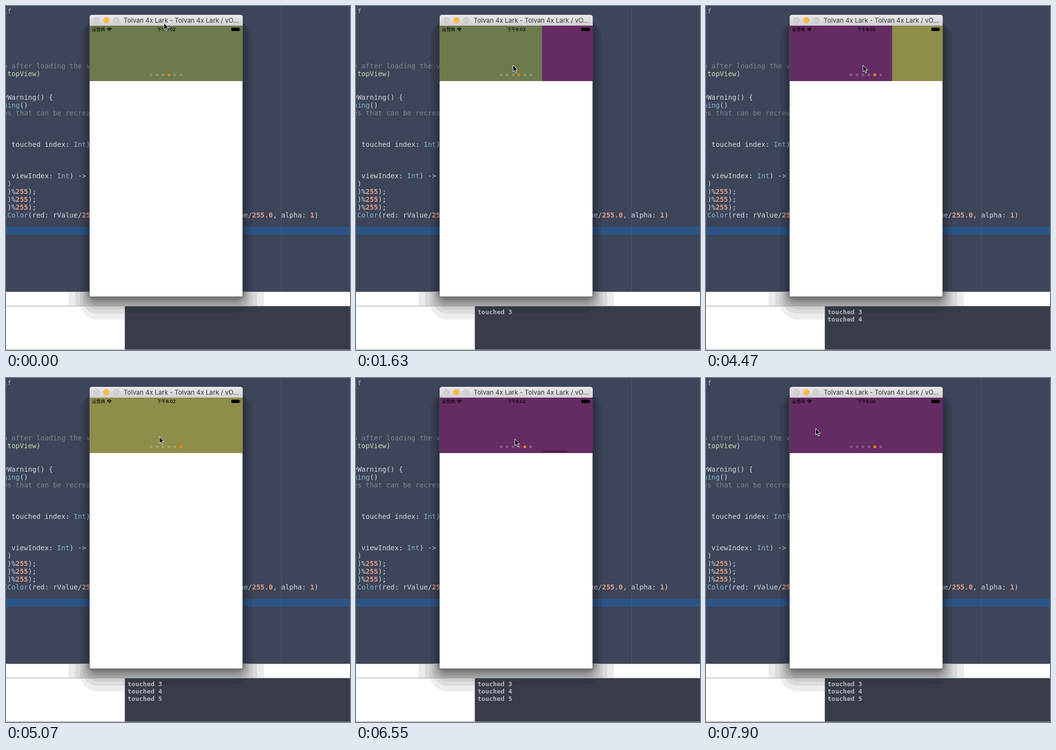
Animation, 699 px wide and 701 px high, one loop 8000 ms. Source, as an HTML page:

```html
<!DOCTYPE html>
<html lang="en">
<head>
<meta charset="utf-8">
<title>Pager in a simulator window</title>
<style>
  html, body { margin: 0; width: 100%; height: 100%; overflow: hidden; background: #3d455a; }
  svg { display: block; width: 699px; height: 701px; }
  text { white-space: pre; }
  .code { font: 14px "DejaVu Sans Mono", monospace; fill: #d3d8e0; }
  .comment { fill: #7d868f; }
  .type { fill: #84b4c8; }
  .call { fill: #c2dba6; }
  .keyword { fill: #c79abb; }
  .number { fill: #e3a088; font-weight: bold; }
  .log { font: bold 13px "DejaVu Sans Mono", monospace; fill: #b4b8be; }
  .title { font: 13px Inter, sans-serif; fill: #343436; }
  .status { font: 500 9px Inter, "Noto Sans CJK SC", "Noto Sans CJK", sans-serif; fill: #000; }
</style>
</head>
<body>
<svg viewBox="0 0 699 701">
  <defs>
    <linearGradient id="chrome" x2="0" y2="1">
      <stop stop-color="#ebe8ec"/><stop offset="1" stop-color="#d2cfd3"/>
    </linearGradient>
    <clipPath id="banner"><rect x="170" y="40" width="310.5" height="113"/></clipPath>
    <clipPath id="onDark"><path d="M0 0H699V582H0ZM242 612H699V700H242Z"/></clipPath>
    <clipPath id="onLight"><path d="M0 583H699V611H0ZM0 612H241V700H0Z"/></clipPath>
    <clipPath id="onStrip"><path d="M0 583H699V611H0Z"/></clipPath>
  </defs>

  <rect width="699" height="582" fill="#3d455a"/>
  <rect y="450" width="699" height="16" fill="#2c5586"/>
  <rect x="559" width="1" height="582" fill="#51596c"/>
  <g id="editor"></g>

  <rect y="582" width="699" height="119" fill="#fff"/>
  <rect x="242" y="612" width="457" height="88" fill="#373c48"/>
  <rect x="241" y="612" width="1" height="88" fill="#8e9096"/>
  <g fill="#9b9b9b">
    <rect y="582" width="699" height="1"/>
    <rect y="611" width="699" height="1"/>
    <rect y="700" width="699" height="1"/>
  </g>
  <g id="stripShadow" clip-path="url(#onStrip)"></g>
  <g id="lightShadow" clip-path="url(#onLight)"></g>
  <g id="darkShadow" clip-path="url(#onDark)"></g>
  <g id="console"></g>

  <rect x="169.5" y="39" width="311.5" height="554" fill="#55575c"/>
  <path d="M170 40V23Q170 18 175 18H476Q481 18 481 23V40Z" fill="url(#chrome)"/>
  <rect x="170" y="40" width="310.5" height="552" fill="#fff"/>
  <g stroke-width="1">
    <circle cx="184" cy="29" r="5.7" fill="#d2d0d3" stroke="#c1bfc2"/>
    <circle cx="204" cy="29" r="5.7" fill="#fdbd3e" stroke="#e6a935"/>
    <circle cx="224" cy="29" r="5.7" fill="#d2d0d3" stroke="#c1bfc2"/>
  </g>
  <text class="title" x="239" y="34">Tolvan 4x Lark - Tolvan 4x Lark / vO...</text>

  <g clip-path="url(#banner)">
    <g id="pages"></g>
    <g id="barFade"><rect id="bar" x="170" y="148.5" width="51.8" height="2" rx="1" opacity=".45"/></g>
  </g>
  <g id="dots"></g>

  <text class="status" x="174.5" y="51">运营商</text>
  <text class="status" x="307" y="51">下午6:02</text>
  <g fill="none" stroke="#000" stroke-width="1.3">
    <path d="M205.4 46.9Q210 42.7 214.6 46.9M207.1 48.8Q210 46.2 212.9 48.8"/>
    <circle cx="210" cy="50.2" r=".5"/>
  </g>
  <rect x="458" y="44.3" width="16.3" height="6.7" rx="1.4"/>
  <rect x="474.9" y="46.3" width="1.2" height="2.7" rx=".6"/>

  <path id="cursor" d="M1 1.5V15L4 12.2L6.4 17.3L8.4 16.4L6.2 11.4H10.2Z"
        fill="#000" stroke="#fff" stroke-width="1"/>
</svg>

<script>
const LOOP = 8000, TICK = 149, PAGE = 311, CELL = 8.428;
const $ = id => document.getElementById(id);

function add(parent, tag, attrs, text = '') {
  const el = document.createElementNS('http://www.w3.org/2000/svg', tag);
  for (const key in attrs) el.setAttribute(key, attrs[key]);
  el.textContent = text;
  parent.append(el);
  return el;
}

// Each line: row, first column, then "class|text" parts.
const lines = [
  [0, -1, 'keyword|self'],
  [7, 1, 'comment|o after loading the view'],
  [8, 2, 'call|topView', ')'],
  [11, 1, 'yWarning() {'],
  [12, 1, 'type|ning', '()'],
  [13, 1, 'comment|es that can be recreated'],
  [17, 3, 'touched index: ', 'type|Int', ')'],
  [21, 3, 'viewIndex: ', 'type|Int', ') ->'],
  [22, 2, ')'],
  ...[23, 24, 25].map(row => [row, 2, ')%', 'number|255', ');']),
  [26, 0, 'type|UIColor', '(red: rValue/', 'number|255.0', ', green: gValue/', 'number|255.0',
    ', blue: bValue/', 'number|255.0', ', alpha: ', 'number|1', ')'],
];
for (const [row, column, ...parts] of lines) {
  const line = add($('editor'), 'text', { class: 'code', x: -14.2 + CELL * column, y: 15 + 16 * row });
  for (const part of parts) {
    const [text, kind = ''] = part.split('|').reverse();
    add(line, 'tspan', { class: kind }, text);
  }
}

// Nested translucent outlines whose reach shrinks by a constant ratio.
function shadow(group, { count, spread, drop, ratio, opacity }) {
  for (let i = 0; i < count; i++) {
    const side = spread * ratio ** i, below = drop * ratio ** i;
    add(group, 'rect', { x: 170 - side, y: 30, width: PAGE + 2 * side,
      height: 562 + below, rx: side + 16, opacity });
  }
}
shadow($('stripShadow'), { count: 2, spread: 43, drop: 120, ratio: .68, opacity: .08 });
shadow($('lightShadow'), { count: 8, spread: 20, drop: 47, ratio: .75, opacity: .07 });
shadow($('darkShadow'), { count: 3, spread: 19, drop: 33, ratio: .6, opacity: .09 });

['#6c7a4e', '#652c64', '#8f8d4a'].forEach((fill, i) =>
  add($('pages'), 'rect', { x: 170 + PAGE * i, y: 40, width: PAGE + .5, height: 113, fill }));

const dot = (i, paint) => add($('dots'), 'circle', { cx: 295 + 12 * i, cy: 140.3, r: 2.8, ...paint });
for (let i = 0; i < 6; i++) dot(i, { fill: '#fff', 'fill-opacity': .2 });
const activeDot = dot(0, { fill: '#ff8000' });

// Motion is described in ticks; every tick is one held picture.
function glide(tick, start, end) {
  const u = Math.min(1, Math.max(0, (tick - start) / (end - start)));
  return u * u * (3 - 2 * u);
}

const strokes = [
  { start: 0, end: 4, x: 318, y: 119 },
  { start: 33, end: 38, x: 247, y: 110 },
  { start: 39, end: 41.2, x: 467, y: 110 },
  { start: 41.2, end: 44, x: 262, y: 128 },
  { start: 44, end: 49.5, x: 560, y: 90 },
  { start: 49.5, end: 53, x: 222, y: 101 },
];
function pointer(tick) {
  let x = 320, y = 33;
  for (const s of strokes) {
    const k = glide(tick, s.start, s.end);
    x += (s.x - x) * k;
    y += (s.y - y) * k;
  }
  return move(x, y);
}

// The timer turns forward in two ticks; two swipes turn back.
const turn = start => ({ start, end: start + 2, by: 1 });
const turns = [turn(9.23), turn(29.23), { start: 40, end: 43, by: -1 },
  { start: 44, end: 47.5, by: -1 }, turn(48.23)];
const sumTurns = (tick, shape) =>
  turns.reduce((page, t) => page + t.by * shape(glide(tick, t.start, t.end)), 3);
const scroll = tick => sumTurns(tick, k => k);
const settled = tick => sumTurns(tick, Math.floor);

const move = (x, y = 0) => ({ transform: `translate(${x}px, ${y}px)` });
const fade = opacity => ({ opacity });

function play(el, styleAt) {
  const frames = [];
  for (let tick = 0; tick * TICK < LOOP; tick++)
    frames.push({ offset: tick * TICK / LOOP, easing: 'step-end', ...styleAt(tick) });
  frames.push({ ...frames.at(-1), offset: 1 });
  el.animate(frames, { duration: LOOP, iterations: Infinity });
}

play($('cursor'), pointer);
play($('pages'), tick => move((3 - scroll(tick)) * PAGE));
play($('bar'), tick => move(scroll(tick) * PAGE / 6));
play($('barFade'), tick => fade(tick > 40 ? 1 - glide(tick, 47.5, 51) : 0));
play(activeDot, tick => move(12 * settled(tick)));

[9, 15, 34].forEach((start, i) => {
  const entry = add($('console'), 'text', { class: 'log', x: 247, y: 628 + 15 * i }, `touched ${3 + i}`);
  play(entry, tick => fade(tick < start ? 0 : 1));
});
</script>
</body>
</html>
```
